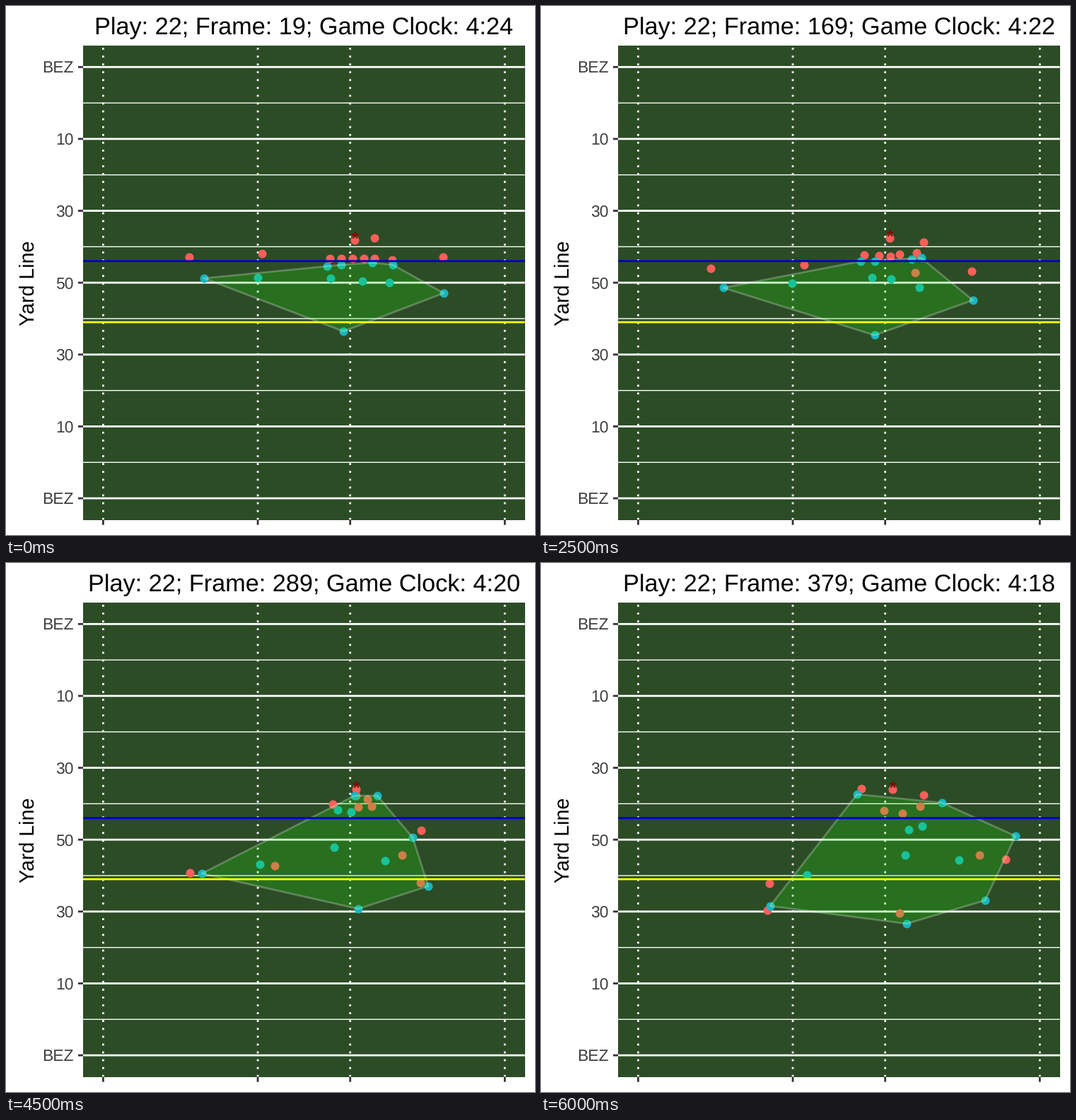
Recreate the animation shown at these times as a matplotlib script. Size 748x748 px, loop 6500 ms.

```python
import matplotlib.pyplot as plt
import numpy as np
from matplotlib.animation import FuncAnimation

SIDE, DPI = 748, 64
STEPS, INTERVAL = 13, 500
LEFT, RIGHT, TOP, BOTTOM = 109, 733.7, 55.8, 726.6
FONT, THICK = 28.57, 2.77
RED, CYAN = "#fc5f5a", "#18b5bd"

plt.rcParams["font.family"] = "Liberation Sans"
plt.rcParams["text.hinting"] = "none"

SNAP = 3
STOPS = {3: (SNAP, 9, 12), 4: (SNAP, 6, 9, 12)}

# Each route: set position, an optional break, late position, end (pixels).
OFFENSE = {
    "WR1": [(242, 357), (260, 438), (320, 491)],
    "WR2": [(362, 350), (380, 428), (323, 453)],
    "WR3": [(618, 355), (602, 392), (586, 452), (507, 495)],
    "TE": [(546, 359), (525, 389), (560, 413), (657, 419)],
    "RB": [(521, 328), (555, 341), (587, 378), (620, 413)],
    "QB": [(493, 331), (495, 320), (497, 320)],
}
BLOCKS = [
    [(462, 341), (485, 350)],
    [(498, 345), (511, 354)],
    [(517, 344), (536, 344)],
    [(495, 329), (453, 319)],
    [(534, 344), (511, 334), (541, 328)],
]
for n, block in enumerate(BLOCKS):
    OFFENSE[f"OL{n}"] = [(458.5 + 15.7 * n, 357)] + block

DEFENSE = {
    "LE": [(454, 368), (469, 349), (520, 377)],
    "LDT": [(474, 366), (488, 352), (539, 372)],
    "RDT": [(518, 363), (524, 353), (493, 329), (447, 327)],
    "RE": [(547, 366), (525, 329), (567, 339)],
    "WLB": [(459, 385), (471, 386), (464, 402), (515, 413)],
    "MLB": [(498, 383), (502, 387), (575, 388), (671, 386)],
    "SLB": [(542, 391), (536, 421), (591, 420)],
    "CB1": [(258, 392), (277, 439), (324, 485)],
    "CB2": [(619, 406), (597, 457), (628, 477)],
    "SS": [(356, 384), (359, 426), (376, 441)],
    "FS": [(466, 461), (498, 489), (517, 510)],
}

# How far from the set position some players start.
SHIFT = {"WR1": (17, -2), "CB1": (22, -7), "FS": (11, -1), "MLB": (6, 6)}


def follow(route, step):
    """Cubic Hermite curve through the route, from a standing start."""
    pts = np.array(route, float)
    stops = np.array(STOPS[len(route)])
    slope = np.gradient(pts, stops, axis=0)
    slope[0] = 0
    k = min(np.searchsorted(stops, step, side="right"), len(stops) - 1) - 1
    span = stops[k + 1] - stops[k]
    u = (step - stops[k]) / span
    ease = u * u * (3 - 2 * u)
    return (pts[k] + ease * (pts[k + 1] - pts[k])
            + span * u * (1 - u) * ((1 - u) * slope[k] - u * slope[k + 1]))


def position(name, route, step):
    if step < SNAP:
        left = 1 - step / SNAP
        return np.array(route[0]) + left * np.array(SHIFT.get(name, (0, 0)))
    return follow(route, step)


def positions(team, step):
    return np.array([position(*player, step) for player in team.items()])


def convex_hull(points):
    ordered = sorted(map(tuple, points))

    def chain(seq):
        out = []
        for p in seq:
            while len(out) > 1:
                (ax, ay), (bx, by) = out[-2:]
                if (bx - ax) * (p[1] - ay) - (by - ay) * (p[0] - ax) > 0:
                    break
                out.pop()
            out.append(p)
        return out[:-1]

    return chain(ordered) + chain(ordered[::-1])


def pt(px):
    return px * 72 / DPI


def yard_y(yards):
    """The 120 yards fill the panel less a 5 % margin at each end."""
    height = (BOTTOM - TOP) / 1.1
    return TOP + height * (0.05 + yards / 120)


def width_x(share):
    return LEFT + (RIGHT - LEFT) * (0.05 + share) / 1.1


fig = plt.figure(figsize=(SIDE / DPI, SIDE / DPI), dpi=DPI, facecolor="white")
ax = fig.add_axes([0, 0, 1, 1])
ax.set(xlim=(0, SIDE), ylim=(SIDE, 0))
ax.axis("off")


def line(xs, ys, color, width=THICK, **kw):
    ax.plot(xs, ys, color=color, lw=pt(width), solid_capstyle="butt",
            dash_capstyle="butt", snap=False, **kw)


def across(yards, color, width=THICK, **kw):
    y = yard_y(yards)
    line([LEFT, RIGHT], [y, y], color, width, **kw)


ax.add_patch(plt.Rectangle((LEFT, TOP), RIGHT - LEFT, BOTTOM - TOP,
                           color="#2c4c26", lw=0))

for yards in range(10, 120, 20):
    across(yards, "white", THICK / 2)
for yards in range(0, 121, 20):
    across(yards, "white")
    y = yard_y(yards)
    line([LEFT - 7.1, LEFT], [y, y], "#333333")
    mark = min(yards, 120 - yards) - 10
    ax.text(96, y + 8.2, "BEZ" if mark < 0 else str(mark),
            size=pt(0.8 * FONT), color="#404040", ha="right", va="baseline")
for share in (0, 0.385, 0.615, 1):
    x = width_x(share)
    line([x, x], [BOTTOM, TOP], "white", ls=(0, (1, 3)))
    line([x, x], [BOTTOM, BOTTOM + 7.1], "#333333")
across(54, "#0000cd", zorder=6)
across(71, "#ffff00", zorder=6)

ax.text(40, 391.6, "Yard Line", size=pt(FONT), rotation=90,
        rotation_mode="anchor", ha="center", va="baseline")
title = ax.text(421.2, 39.6, "", size=pt(1.2 * FONT), ha="center",
                va="baseline")


def dots(color):
    return ax.plot([], [], "o", color=color, ms=pt(12), mew=0, zorder=3)[0]


red_dots, cyan_dots = dots(RED), dots(CYAN)
star = ax.text(0, 0, "*", size=pt(FONT), color="#8b0000", ha="center",
               va="baseline", zorder=4)
area = ax.add_patch(plt.Polygon([(0, 0)] * 3, fc=(0.1, 1, 0.02, 0.2),
                                ec="none", zorder=5))
edge = ax.add_patch(plt.Polygon([(0, 0)] * 3, fc="none", ec=(1, 1, 1, 0.25),
                                lw=pt(THICK), joinstyle="round", zorder=5))


def draw(step):
    title.set_text(f"Play: 22; Frame: {19 + 30 * step}; "
                   f"Game Clock: 4:{24 - step // 2}")
    defense = positions(DEFENSE, step)
    red_dots.set_data(*positions(OFFENSE, step).T)
    cyan_dots.set_data(*defense.T)
    hull = convex_hull(defense)
    area.set_xy(hull)
    edge.set_xy(hull)
    x, y = position("QB", OFFENSE["QB"], step)
    star.set_position((x, y + 8.3))
    return title, red_dots, cyan_dots, star, area, edge


anim = FuncAnimation(fig, draw, frames=STEPS, interval=INTERVAL,
                     repeat=True, repeat_delay=0, blit=False)
plt.show()
```
